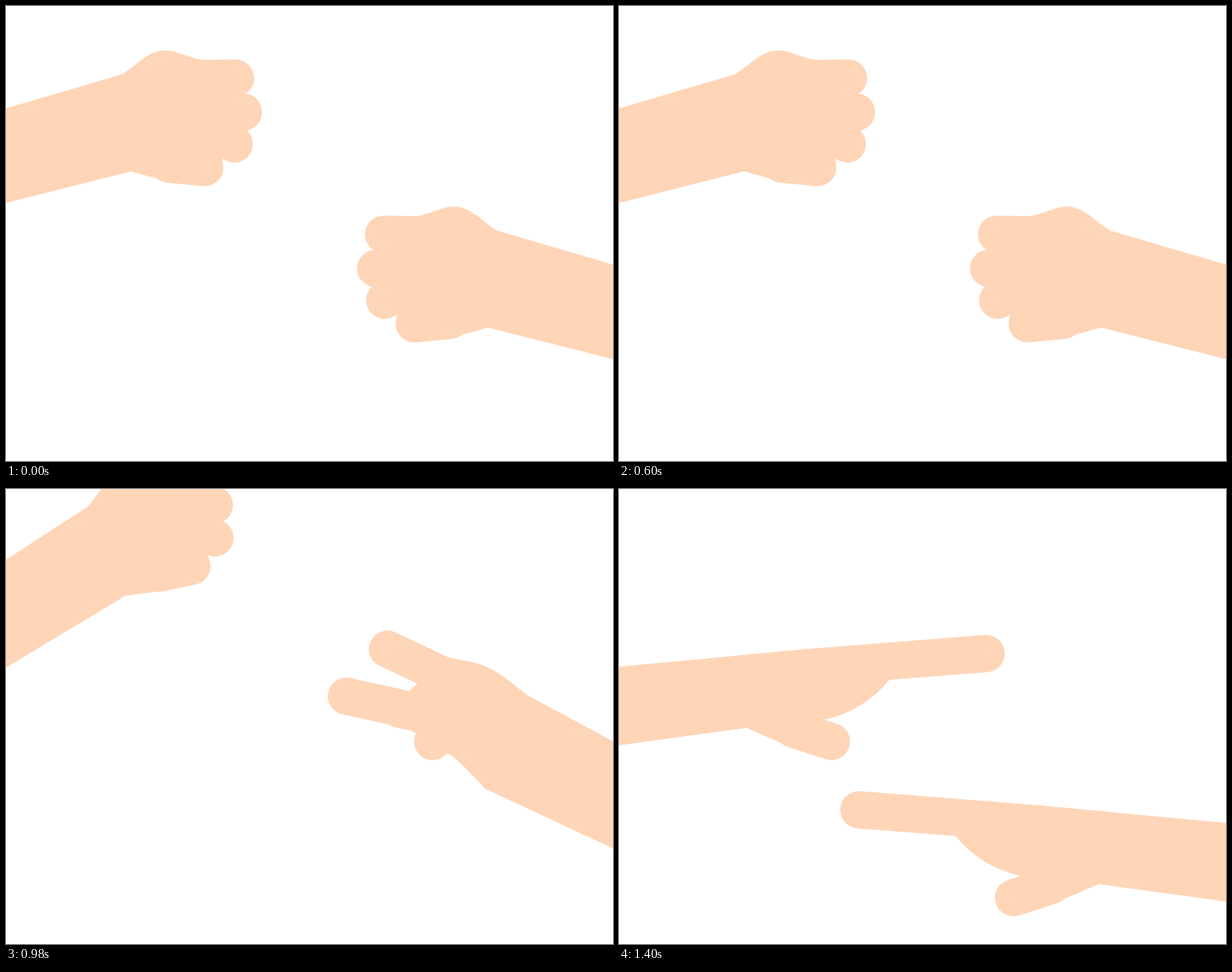
An HTML page with a canvas that plays this animation: 800 px wide and 600 px high, repeating every 1.42 s.

```html
<!DOCTYPE html>
<html lang="en">
<head>
<meta charset="utf-8">
<title>Hands</title>
<style>
  html, body { margin: 0; width: 800px; height: 600px; overflow: hidden; background: #fff; }
  canvas { display: block; }
</style>
</head>
<body>
<canvas id="stage" width="800" height="600"></canvas>
<script>
const ctx = document.getElementById('stage').getContext('2d');
const LOOP = 1420, STEP = 20, SKIN = '#ffd5b7';
const R = 24.5;              // finger radius
const PIVOT = [-108, 206];   // elbow joint, off stage
const REST = 600, TOP = 860, END = 1400, LIFT = 25.1;

const rock = {
  armTop: [-300, 223], wristTop: [153, 90], knuckle: [204, 59], base: [257, 71],
  heel: [266, 117], web: [285, 206], thumbEdge: [212, 233],
  wristLow: [165, 218], armLow: [-300, 336], palm: [235, 140],
  index: [302.5, 95], middle: [313, 140], ring: [301, 182], thumb: [262, 213]
};
const scissors = {
  armTop: [-300, 258], wristTop: [120, 147.4], knuckle: [190, 129], base: [246, 114.2],
  heel: [360, 235], web: [280, 276], thumbEdge: [205, 288],
  wristLow: [166, 284], armLow: [-300, 368], palm: [230, 203],
  index: [374.5, 106.5], middle: [455.5, 219.5], ring: [294, 162], thumb: [266.5, 297]
};
const paper = {
  armTop: [-300, 262], wristTop: [100, 225], knuckle: [183, 217], base: [248, 211],
  heel: [357, 251], web: [272, 304], thumbEdge: [222, 340],
  wristLow: [168, 315], armLow: [-300, 379], palm: [230, 265],
  index: [484, 217], middle: [220, 240], ring: [220, 240], thumb: [280, 333]
};

// wobble: [degrees, half period]; fall: ms from the top to level; forms: [pose, from, to]
const hands = [
  { place: [1, 0, 0, 1, 0, 0], wobble: [11, 370], fall: 366,
    forms: [[paper, 950, 1230]] },
  { place: [-1, 0, 0, 1, 800, 206], wobble: [-9.3, 227.5], fall: 220,
    forms: [[scissors, 880, 1080], [paper, 1080, 1240]] }
];

const add = (a, b, k = 1) => [a[0] + b[0] * k, a[1] + b[1] * k];
const sub = (a, b) => add(a, b, -1);
const lerp = (a, b, k) => add(a, sub(b, a), k);

function ease(t, from, to) {
  const u = Math.min(1, Math.max(0, (t - from) / (to - from)));
  return u * u * (3 - 2 * u);
}

// Degrees raised: a fading wobble, a lift, then a swing down that settles.
function raise({ wobble: [amount, half], fall }, t) {
  if (t < REST) return amount * (1 - t / REST) * Math.sin(Math.PI * t / half);
  if (t < TOP) return LIFT * ease(t, REST, TOP);
  const u = Math.min(1, (t - TOP) / (END - TOP));
  return LIFT * (1 - u) * Math.cos(Math.PI / 2 * (t - TOP) / fall);
}

// Finger tips trail the palm, and the thumb tucks in on the way.
function blend(a, b, w) {
  const tips = ['index', 'middle', 'ring', 'thumb'];
  const pose = {};
  for (const key in a) pose[key] = lerp(a[key], b[key], tips.includes(key) ? w ** 1.3 : w);
  for (const key of ['web', 'thumbEdge', 'thumb'])
    pose[key] = lerp(pose[key], pose.palm, 2.2 * w * (1 - w));
  return pose;
}

// Offset from a finger's straight edge, starting at a point, to its centre line.
function inset(edge, tip, side) {
  const [x, y] = sub(tip, edge);
  const a = Math.atan2(y, x) - side * Math.asin(Math.min(1, R / Math.hypot(x, y)));
  return [-side * R * Math.sin(a), side * R * Math.cos(a)];
}

function finger(from, tip) {
  ctx.beginPath();
  ctx.moveTo(...from);
  ctx.lineTo(...tip);
  ctx.stroke();
}

function drawPose(p) {
  const along = sub(p.base, p.wristTop);
  const chord = sub(p.web, p.heel);
  const bulge = add(lerp(p.heel, p.web, 0.5), [chord[1], -chord[0]], 0.17);
  const indexIn = inset(p.base, p.index, 1);
  const thumbIn = inset(p.thumbEdge, p.thumb, -1);

  ctx.beginPath();
  ctx.moveTo(...p.armTop);
  ctx.lineTo(...p.wristTop);
  ctx.bezierCurveTo(...lerp(p.wristTop, p.knuckle, 0.37), ...add(p.knuckle, along, -0.2), ...p.knuckle);
  ctx.bezierCurveTo(...add(p.knuckle, along, 0.15), ...lerp(p.base, p.knuckle, 0.4), ...p.base);
  ctx.lineTo(...p.heel);
  ctx.quadraticCurveTo(...bulge, ...p.web);
  ctx.lineTo(...sub(p.thumb, thumbIn));
  ctx.quadraticCurveTo(...p.thumbEdge, ...p.wristLow);
  ctx.lineTo(...p.armLow);
  ctx.fill();

  finger(add(p.base, indexIn), p.index);
  finger(p.palm, p.middle);
  finger(p.palm, p.ring);
  finger(add(p.thumbEdge, thumbIn), p.thumb);
}

function drawHand(hand, t) {
  let pose = rock;
  for (const [next, from, to] of hand.forms)
    if (t > from) pose = blend(pose, next, ease(t, from, to));
  ctx.setTransform(...hand.place);
  ctx.translate(...PIVOT);
  ctx.rotate(-raise(hand, t) * Math.PI / 180);
  ctx.translate(-PIVOT[0], -PIVOT[1]);
  drawPose(pose);
}

function draw(t) {
  ctx.setTransform(1, 0, 0, 1, 0, 0);
  ctx.fillStyle = '#fff';
  ctx.fillRect(0, 0, 800, 600);
  ctx.fillStyle = ctx.strokeStyle = SKIN;
  ctx.lineWidth = 2 * R;
  ctx.lineCap = 'round';
  hands.forEach(hand => drawHand(hand, t));
}

const start = performance.now();
function tick() {
  const t = (performance.now() - start) % LOOP;
  draw(Math.floor(t / STEP) * STEP);
  requestAnimationFrame(tick);
}
tick();
</script>
</body>
</html>
```
